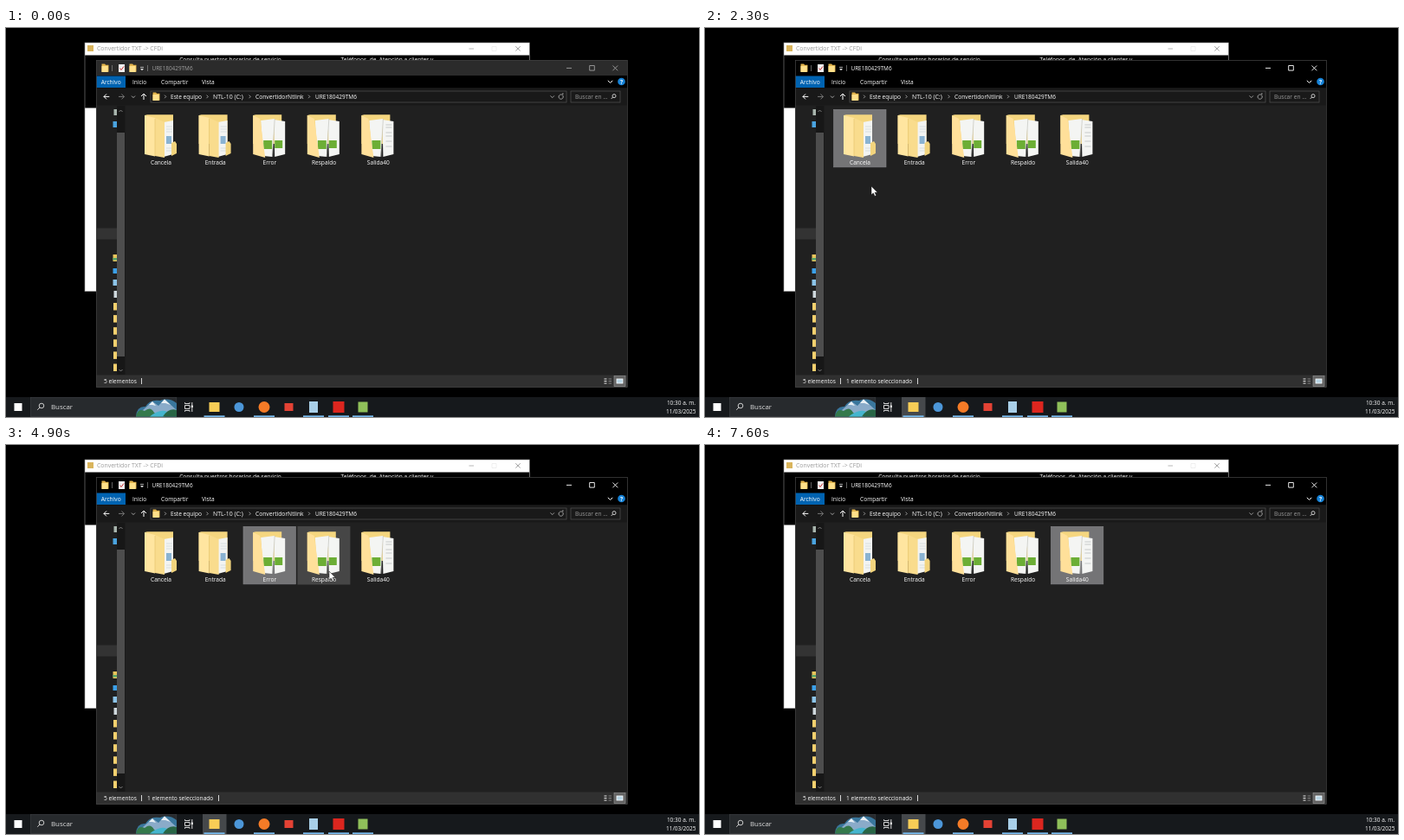
An HTML page that plays this animation: 800x450 px, repeating every 7700 ms.

```html
<!DOCTYPE html>
<html lang="es">
<head>
<meta charset="utf-8">
<style>
html, body { margin: 0; width: 100%; height: 100%; overflow: hidden; background: #000; }
svg { display: block; width: 800px; height: 450px; }
text { font: 6.6px "Open Sans", "Noto Sans", sans-serif; white-space: pre; }
</style>
</head>
<body>
<svg id="stage" viewBox="0 0 800 450"></svg>
<script>
const LOOP = 7700, STEP = 100, ACTIVATE = 1700;
const names = ['Cancela', 'Entrada', 'Error', 'Respaldo', 'Salida40'];
// [time, x, y] of the pointer tip
const path = [
  [800, 230, 450], [1100, 200, 240], [1400, 169, 155], [1500, 167, 152], [1700, 174, 148],
  [2000, 178, 158], [2300, 192, 183], [2400, 205, 172], [2700, 235, 140], [2900, 240, 142],
  [3200, 243, 165], [3400, 255, 193], [3600, 288, 165], [3800, 312, 143], [4100, 306, 141],
  [4400, 322, 172], [4700, 355, 160], [4900, 373, 146], [5100, 369, 145], [5400, 385, 167],
  [5700, 415, 160], [5900, 430, 156], [6200, 429, 150], [6600, 428, 175], [6900, 425, 192]
];
const HIDE = 7000;
// [time, index] of each selection
const clicks = [[ACTIVATE, 0], [2900, 1], [4100, 2], [5100, 3], [6200, 4]];

const rect = (x, y, w, h, fill, more = '') =>
  `<rect x="${x}" y="${y}" width="${w}" height="${h}" fill="${fill}" ${more}/>`;
const shape = (d, fill) => `<path d="${d}" fill="${fill}"/>`;
const line = (d, color = '#fff', w = .8) =>
  `<path d="${d}" fill="none" stroke="${color}" stroke-width="${w}"/>`;
const dot = (x, y, r, fill) => `<circle cx="${x}" cy="${y}" r="${r}" fill="${fill}"/>`;
const text = (x, y, s, fill = '#fff', style = '', more = '') =>
  `<text x="${x}" y="${y}" fill="${fill}" style="${style}" ${more}>${s}</text>`;
const mid = 'text-anchor="middle"';
const lens = (x, y, r) => `<circle cx="${x}" cy="${y}" r="${r}" fill="none" stroke="#ddd" stroke-width=".9"/>` +
  line(`M${x - r * .7} ${y + r * .7}l${-r} ${r}`, '#ddd', .9);
const smallFolder = (x, y, w = 8) =>
  shape(`M${x} ${y}h${w * .45}l1 1.2h${w * .42}v8h${-w}z`, '#e2b44c') + rect(x, y + 2.5, w * .9, 7, '#ffe08a');
const chevron = x => line(`M${x} 77.6l1.8 1.8l-1.8 1.8`, '#ccc', .7);

function backWindow() {
  return rect(91, 17, 513.3, 287.7, '#fff') + rect(91, 31.5, 513.3, 61, '#000') +
    rect(91, 17, 513.3, 287.7, 'none', 'stroke="#8a8a8a" stroke-width=".6"') +
    rect(94, 20, 7, 7, '#d9b45c') +
    text(105, 26.2, 'Convertidor TXT -&gt; CFDi', '#999', 'font-size:6.9px') +
    line('M534.5 24h5.5', '#999', .7) + line('M561 21.5h5v5h-5z', '#e4e4e4', .6) +
    line('M588.3 21.2l5.4 5.4m0-5.4l-5.4 5.4', '#777', .7) +
    text(259, 39, 'Consulta nuestros horarios de servicio', '#fff',
      'font:5.4px "Liberation Sans",sans-serif', mid) +
    text(440, 39, 'Teléfonos  de  Atención a clientes y', '#fff',
      'font:bold 5.7px "Liberation Sans",sans-serif', mid);
}

function sidebar() {
  let s = rect(105, 231.5, 23, 13, '#333') +
    rect(124.5, 94, 3.5, 7, '#a8b5ad') + rect(123.5, 108, 4.5, 7, '#4aa3df') +
    rect(123.5, 262, 4.5, 8, '#e6c45c') + rect(123.5, 266, 4.5, 2.5, '#55a86a') +
    rect(123.5, 278, 4.5, 6, '#3ba0e8') + rect(123.5, 291, 4.5, 7, '#8cc4e8') +
    rect(124.5, 304, 3.5, 8, '#cfd8dd');
  for (let y = 318; y < 390; y += 14.1) s += rect(124, y, 4, 8.5, '#f4d06e');
  return s + rect(128, 90, 9.5, 311, '#171717') + rect(128, 121, 9, 259, '#4d4d4d') +
    line('M130.5 97l2-2l2 2M130.5 395l2 2l2-2', '#999', .8);
}

function folder(i) {
  let inner;
  if (i < 2) {
    inner = shape('M22 9L33 7V46L22 49Z', '#f3f4f2') +
      line('M25 14h7M25 17h7M25 20h7M25 39h7M25 42h7', '#c3ced4', .6) +
      rect(25, 25, 6, 9, '#8ab3d2') +
      shape('M31 33L35 31L37 34V45L31 48Z', '#f2d47d') +
      shape('M0 1L12 4V48.5L0 46Z', '#ffe5a0') +
      shape('M12 4L23 9V50L12 48Z', '#f9dc8d') + line('M12 5V48', '#e3c269', .6);
  } else {
    // a pale leaf with a plain green square stands for each document
    inner = shape('M24 6L37 8V46L25 49Z', '#f4f5f3') +
      (i < 4 ? rect(25, 30, 9, 9, '#6cae35')
        : line('M28 12h7M28 15h7M28 21h7M28 25h7M28 31h7M28 37h7', '#a6abad', .6)) +
      shape('M9 7L25 5L22 49L12 48Z', '#f4f5f3') + rect(12, 30, 10, 10, '#6cae35') +
      line('M25 5L22.5 49', '#b9bbb6', .6) +
      shape('M0 1L8 5L14 50L0 46Z', '#ffe09a');
  }
  return `<g transform="translate(${160 + 62.6 * i} 100)">` +
    shape('M0 1L3 .3H33V34H0Z', '#f5d67f') + inner + '</g>' +
    text(179 + 62.7 * i, 158.2, names[i], '#fff', '', mid);
}

function explorer() {
  return rect(104, 37, 613.5, 379, '#202020') + '<g id="titlebar"></g>' +
    rect(104.5, 55, 612.5, 14.5, '#000') + rect(104.5, 55.5, 33.5, 13.5, '#0063b1') +
    text(121.2, 64.8, 'Archivo', '#fff', '', mid) + text(146, 64.8, 'Inicio') +
    text(179, 64.8, 'Compartir') + text(226, 64.8, 'Vista') +
    line('M694.8 60.8l2.7 2.7l2.7-2.7', '#fff', 1) + dot(710.5, 62, 4.3, '#1683d8') +
    text(710.5, 64.5, '?', '#fff', 'font-weight:700', mid) +
    rect(104.5, 69.5, 612.5, 20, '#191919') +
    line('M112.8 79.4h6.5M116 76.4l-3 3l3 3', '#fff', 1) +
    line('M130 79.4h6.5M133.5 76.4l3 3l-3 3', '#777', 1) +
    line('M145 78.6l2 2l2-2', '#ccc') + line('M159 83v-7M156 79l3-3l3 3', '#fff', 1) +
    rect(167, 73, 480, 13, '#191919', 'stroke="#535353" stroke-width=".7"') +
    rect(652, 73, 57, 13, '#191919', 'stroke="#535353" stroke-width=".7"') +
    smallFolder(169.5, 74.5) + chevron(183) + text(190, 81.8, 'Este equipo') + chevron(231.5) +
    text(239, 81.8, 'NTL-10 (C:)', '#fff', 'font-size:6.9px') + chevron(280.5) +
    text(288, 81.8, 'ConvertidorNtlink', '#fff', 'font-size:6.7px') +
    chevron(349) + text(357, 81.8, 'URE180429TM6', '#fff', 'font-size:6.5px') +
    line('M628.5 78.4l2.2 2.2l2.2-2.2', '#bbb') +
    line('M642.7 78a2.6 2.6 0 1 1-2-1h2.2v-1.8', '#bbb') +
    text(657, 81.8, 'Buscar en ...', '#999') + lens(702, 78.6, 2) +
    sidebar() + '<g id="tiles"></g>' + names.map((_, i) => folder(i)).join('') +
    rect(104.5, 401.5, 612.5, 14, '#303030') + text(113, 411, '5 elementos') +
    line('M156.5 405v7') + '<g id="status"></g>' +
    line('M690.5 406h3M690.5 408.5h3M690.5 411h3', '#eee', 1.2) +
    line('M695.5 406h3.5M695.5 408.5h3.5M695.5 411h3.5', '#999', .8) +
    rect(702, 402.5, 13, 12, '#626262', 'stroke="#999" stroke-width=".6"') +
    rect(705, 406, 7, 5, '#b9d5e4', 'stroke="#fff" stroke-width=".8"') +
    rect(104.3, 37.3, 613, 378.4, 'none', 'stroke="#484848" stroke-width=".6"');
}

function taskbar() {
  const lit = [240.5, 298, 355, 384, 412];
  return rect(0, 427, 800, 23, '#16191c') + rect(9.5, 434, 9, 9, '#fff') +
    rect(28.3, 427.3, 168.5, 22.4, '#272a2d', 'stroke="#3d4043" stroke-width=".6"') +
    lens(41, 437, 2.8) + text(52, 441.3, 'Buscar', '#ddd', 'font-size:7.9px') +
    shape('M150 449.5Q151 437 161 438Q166 429 178 431Q188 427 197 434V449.5Z', '#39769c') +
    shape('M157 443L169 432L176 437L183 429.5L197 442V449H157Z', '#8aabc9') +
    shape('M165 436L169 432L173 437L169 436ZM179 434L183 429.5L190 436L184 434Z', '#e8f0f5') +
    shape('M150 449.5Q152 439 160 443Q167 437 171 445L178 449.5Z', '#34794b') +
    shape('M166 449.5Q178 440 186 444L183 449.5Z', '#45b5ce') +
    shape('M181 449.5Q188 439 197 442V449.5Z', '#286545') +
    line('M206.5 436.5h5.5v4h-5.5zM206.5 433.2v1.3h5.5v-1.3M206.5 443.8v-1.3h5.5v1.3M214.8 433v11', '#eee', .9) +
    rect(213.8, 436.5, 2, 2.5, '#eee') +
    '<g id="active"></g>' + rect(234.5, 433, 12, 11, '#f7cd56') + dot(269, 438.5, 5.5, '#4c96d8') +
    dot(298, 438.5, 6.5, '#f47b27') + rect(321.5, 434, 10, 9, '#e34234') +
    rect(350, 432, 10, 13, '#a9cfe8') + rect(377.5, 432, 13, 13, '#dc261f') +
    rect(406.5, 432.5, 11, 12, '#8fc05a') +
    lit.map(x => rect(x - 12, 448.3, 24, 1.7, '#76b9ed')).join('') +
    text(796, 435.6, '10:30 a. m.', '#fff', 'font-size:6.5px', 'text-anchor="end"') +
    text(796.5, 446, '11/03/2025', '#fff', 'font-size:6.5px', 'text-anchor="end"');
}

function titlebar(active) {
  const ink = active ? '#fff' : '#a0a0a0';
  return rect(104.5, 37.5, 612.5, 17.5, active ? '#000' : '#2b2b2b') +
    smallFolder(110.5, 41.5) + line('M122.5 43v7', '#888', .7) +
    rect(130, 42, 7, 9, '#f2f2f2') + line('M131.5 46.5l1.5 2l3-4', '#c33', 1) +
    smallFolder(142.5, 41.5) + line('M155 45.4h4', '#ddd') + shape('M155 47h4l-2 2.2z', '#ddd') +
    line('M163.5 43v7', '#888', .7) + text(168.5, 49, 'URE180429TM6', ink, 'font-size:6.4px') +
    line('M647 46.4h6M673.7 43.5h5.6v5.6h-5.6zM700.4 43.5l5.8 5.8m0-5.8l-5.8 5.8', ink, .9);
}

function pointer(t) {
  if (t < path[0][0] || t >= HIDE) return null;
  const k = path.findIndex(p => p[0] > t);
  if (k < 0) return path[path.length - 1].slice(1);
  const a = path[k - 1], b = path[k], u = (t - a[0]) / (b[0] - a[0]);
  return [a[1] + (b[1] - a[1]) * u, a[2] + (b[2] - a[2]) * u];
}

const $ = id => document.getElementById(id);
$('stage').innerHTML = backWindow() + explorer() + taskbar() +
  `<path id="pointer" d="M0 0V10L2.3 7.9L4 11.5L5.7 10.8L4.1 7.3H7.2Z" fill="#fff" stroke="#111" stroke-width=".5"/>`;

function draw(t) {
  const active = t >= ACTIVATE, tip = pointer(t);
  let chosen = -1;
  for (const [time, i] of clicks) if (t >= time) chosen = i;
  $('titlebar').innerHTML = titlebar(active);
  $('active').innerHTML = active ? rect(227, 427, 27.5, 23, '#45484b') : '';
  $('status').innerHTML = active ? text(163, 411, '1 elemento seleccionado') + line('M245.5 405v7') : '';
  $('tiles').innerHTML = names.map((_, i) => {
    const x = 148.3 + 62.7 * i;
    const over = tip && tip[0] >= x && tip[0] < x + 61 && tip[1] >= 94 && tip[1] < 161.5;
    if (i === chosen) return rect(x + .3, 94.3, 60.4, 66.6, '#747476', 'stroke="#88888a" stroke-width=".6"');
    return over ? rect(x, 94, 61, 67.5, '#464646') : '';
  }).join('');
  $('pointer').style.display = tip ? '' : 'none';
  if (tip) $('pointer').setAttribute('transform', `translate(${tip})`);
}

const start = performance.now();
let shown = -1;
function tick() {
  const t = Math.floor((performance.now() - start) % LOOP / STEP) * STEP;
  if (t !== shown) draw(shown = t);
  requestAnimationFrame(tick);
}
tick();
</script>
</body>
</html>
```
